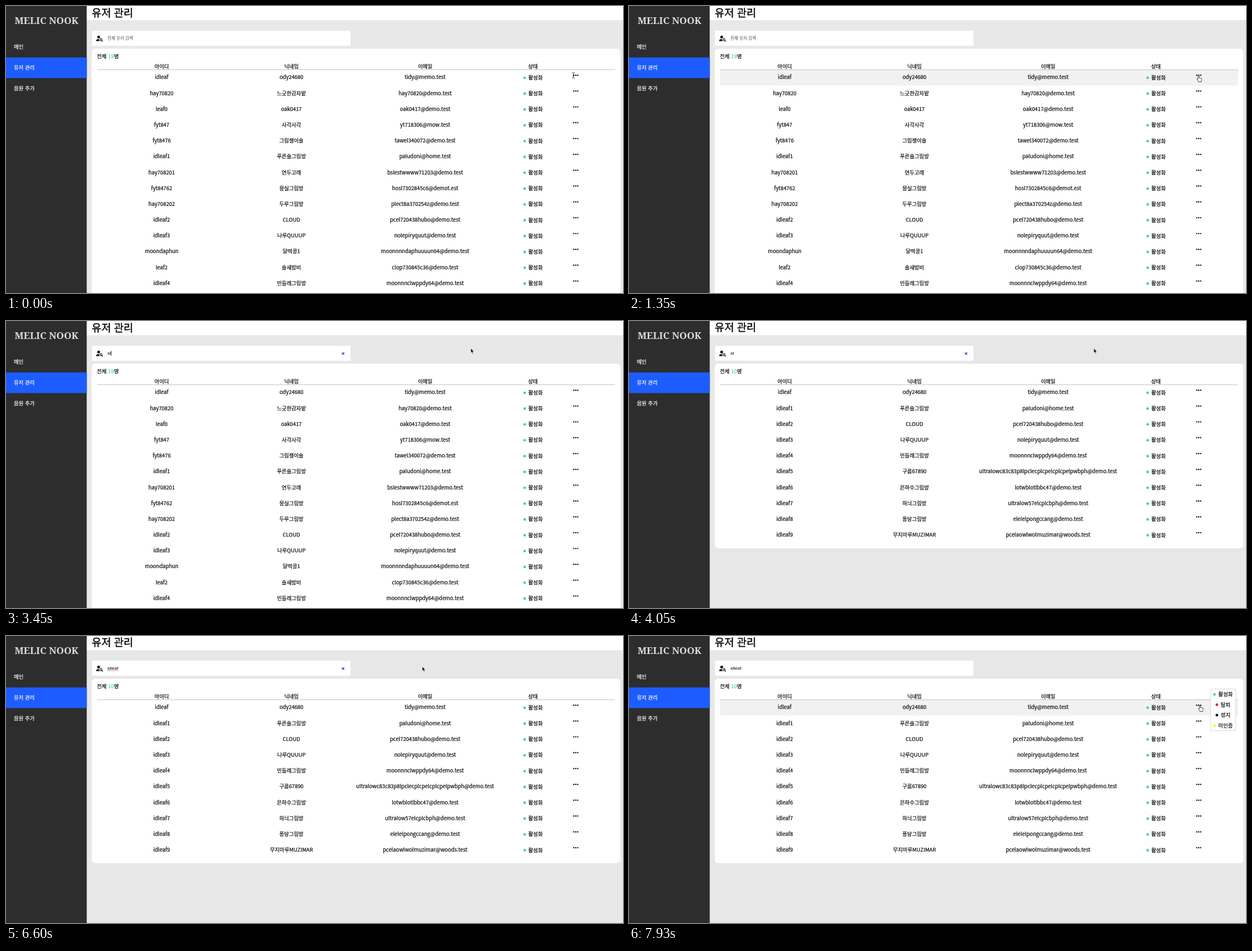
Recreate the animation shown at these times as an HTML page. Size 1096 by 511 pixels, loop 8000 ms.

```html
<!DOCTYPE html>
<html lang="ko">
<head>
<meta charset="utf-8">
<title>유저 관리</title>
<style>
  html, body { margin: 0; width: 100%; height: 100%; overflow: hidden; background: #e8e8e8; }
  svg { display: block; width: 1096px; height: 511px; }
  text { font: 9.33px "Noto Sans CJK KR", "Noto Sans KR", "Noto Sans CJK", sans-serif; white-space: pre;
         color: #0a0a0a; fill: currentColor; stroke: currentColor; stroke-width: .22px; }
  .mid text, text.mid { text-anchor: middle; }
  .menu text { color: #fff; }
  text.logo { font: 700 17px "Noto Serif", serif; color: #dcdcdc; stroke: none; text-anchor: middle; }
  text.title { font-size: 18.6px; stroke-width: .4px; }
  text.hint { font-size: 7.5px; color: #707070; stroke-width: .15px; }
  text.query { font: 8px "Liberation Sans", Arial, sans-serif; color: #000; stroke: none; }
  .green { color: #4adb80; fill: currentColor; }
</style>
</head>
<body>
<svg viewBox="0 0 1096 511">
  <rect id="back" width="1096" height="511" fill="#e8e8e8"/>
  <rect x="143" width="953" height="25.3" fill="#fff"/>
  <rect width="143.4" height="511" fill="#2d2d2d"/>
  <text class="logo" x="72" y="32.4">MELIC NOOK</text>
  <rect y="91.6" width="143.4" height="36.7" fill="#1d5dff"/>
  <g class="menu">
    <text x="14" y="75.7">메인</text>
    <text x="14" y="112.7">유저 관리</text>
    <text x="14" y="149.7">음원 추가</text>
  </g>
  <text id="title" class="title" x="152.3">유저 관리</text>

  <rect x="153" y="44" width="459" height="26.7" fill="#fff"/>
  <g fill="#111">
    <circle cx="164.6" cy="55.3" r="2.5"/>
    <path d="M160.2 62.6V61.2Q160.4 59 165 58.8Q164.8 61 166.6 62.6Z"/>
    <circle cx="168.7" cy="60" r="1.8" fill="none" stroke="#111" stroke-width="1.2"/>
    <path d="M170 61.3L171.9 63.2" stroke="#111" stroke-width="1.3"/>
  </g>
  <text id="hint" class="hint" x="180" y="60.4">전체 유저 검색</text>
  <text id="query" class="query" x="180.3" y="60.3"></text>
  <path id="typo" d="M180.3 61.7H199.3" stroke="#e8413c" stroke-width="1.1" stroke-dasharray="1.2 .8"/>
  <rect id="caret" y="53" width=".8" height="9" fill="#000"/>
  <path id="clear" d="M596.8 56L600.8 60M600.8 56L596.8 60" stroke="#2450b4" stroke-width="1.3"/>

  <rect id="panel" x="152.3" y="76" width="939" rx="6" fill="#fff"/>
  <text x="161.5" y="92.8">전체 <tspan id="count" class="green"></tspan>명</text>
  <g class="mid">
    <text x="276.5" y="110.8">아이디</text>
    <text x="507" y="110.8">닉네임</text>
    <text x="744.5" y="110.8">이메일</text>
    <text x="936" y="110.8">상태</text>
  </g>
  <rect id="hover" x="162" width="920" height="28" fill="#f1f1f1"/>
  <rect x="162" y="113" width="920" height=".8" fill="#b4b4b4"/>
  <g id="all" class="mid"></g>
  <g id="found" class="mid"></g>

  <g id="drop" class="mid">
    <rect x="1033" y="94.5" width="44.6" height="74" fill="#fff" stroke="#d8d8d8"/>
  </g>

  <g id="cursor">
    <path id="arrow" d="M0 0V8.3L1.9 6.6L3.2 9.8L4.7 9.2L3.4 6.1H6Z" fill="#111" stroke="#fff" stroke-width=".7"/>
    <path id="beam" d="M-2.4 -5Q-.3 -5 0 -4Q.3 -5 2.4 -5M0 -4V4M-2.4 5Q-.3 5 0 4Q.3 5 2.4 5M-1 1.5H1" fill="none" stroke="#222" stroke-width=".9"/>
    <path id="hand" d="M-1 .8Q0 -.5 1 .8V4Q2 3.3 2.7 4.2Q3.6 3.7 4.2 4.7Q5.3 4.4 5.4 5.5V7.6Q5.2 9 4.6 9.6V10.8H-.2V9.8L-2.6 6.8Q-3.2 5.7 -2.3 5.4Q-1.6 5.3 -1 6.2Z" fill="#fff" stroke="#111" stroke-width=".8"/>
  </g>
</svg>
<script>
const $ = id => document.getElementById(id);
const LOOP = 8000, ROW_TOP = 113.6, ROW_H = 28.19, ROW_X = [276.5, 507, 744.5];

// id, nickname, mail
const users = `idleaf ody24680 tidy@memo.test
hay70820 느긋한감자밭 hay70820@demo.test
leaf0 oak0417 oak0417@demo.test
fyt847 사각사각 yt718306@mow.test
fyt8476 그림쟁이솔 tawel340072@demo.test
idleaf1 푸른솔그림방 paludoni@home.test
hay708201 연두고래 bslestwwww71203@demo.test
fyt84762 몽실그림방 hosl7302845c6@demot.est
hay708202 두루그림방 plect8a370254z@demo.test
idleaf2 CLOUD pcel720438hubo@demo.test
idleaf3 나루QUUUP nolepiryquut@demo.test
moondaphun 달떡콩1 moonnnndaphuuuun64@demo.test
leaf2 솔새밤비 clop730845c36@demo.test
idleaf4 민들레그림방 moonnnclwppdy64@demo.test
idleaf5 구름67890 ultralowc83c83p8lpclecplcpelcplcpelpwbph@demo.test
idleaf6 은하수그림방 lotwblotlbbc47@demo.test
idleaf7 하늬그림방 ultralow57elcplcbph@demo.test
idleaf8 퐁당그림방 elelelpongccang@demo.test
idleaf9 무지마루MUZIMAR pcelaowlwolmuzimar@woods.test`.split("\n").map(line => line.split(" "));
const matches = users.filter(u => u[0].startsWith("id"));

function add(parent, tag, attrs, text = "") {
  const el = document.createElementNS("http://www.w3.org/2000/svg", tag);
  for (const k in attrs) el.setAttribute(k, attrs[k]);
  el.textContent = text;
  parent.append(el);
}

function fillTable(group, list) {
  list.forEach((user, i) => {
    const y = i * ROW_H;
    user.forEach((s, k) => add(group, "text", { x: ROW_X[k], y: 130.4 + y }, s));
    add(group, "circle", { cx: 921.3, cy: 127.8 + y, r: 2.4, class: "green" });
    add(group, "text", { x: 940.6, y: 130.9 + y }, "활성화");
    for (const dx of [-3.5, 0, 3.5]) add(group, "circle", { cx: 1012 + dx, cy: 123.2 + y, r: 1.2, fill: "#111" });
  });
}
fillTable($("all"), users);
fillTable($("found"), matches);

[["활성화", "#4adb80"], ["탈퇴", "#f81818"], ["정지", "#000"], ["미인증", "#fff02e"]].forEach(([s, fill], i) => {
  const y = 104 + i * 18.4;
  add($("drop"), "circle", { cx: 1052.9 - s.length * 4.3, cy: y, r: 2.4, fill });
  add($("drop"), "text", { x: 1059.7, y: y + 3.4 }, s);
});

// time, x, y, shape
const moves = [
  [0, 1008, 123.5, "beam"], [150, 1011, 128, "hand"], [300, 1012, 150, "hand"],
  [450, 1012, 170, "hand"], [600, 1013, 179, "hand"], [750, 1013, 164, "hand"],
  [900, 1012, 143, "hand"], [1050, 1012, 125, "hand"], [1200, 1013, 124, "hand"],
  [1350, 1011.8, 124.2, "hand"],
  [1800, 900, 96, "arrow"], [1950, 640, 54, "arrow"], [2100, 420, 39, "arrow"], [2250, 330, 58, "beam"],
  [2550, 640, 56, "arrow"], [2700, 825.6, 48.6, "arrow"],
  [5550, 818, 47, "arrow"], [5700, 795, 48, "arrow"], [5850, 765, 51, "arrow"],
  [6000, 746, 53, "arrow"], [6150, 739.3, 54.2, "arrow"],
  [6750, 780, 66, "arrow"], [6900, 880, 104, "arrow"], [7050, 975, 160, "arrow"],
  [7200, 1010, 182, "hand"], [7340, 1012, 172, "hand"], [7490, 1013, 150, "hand"],
  [7640, 1013, 130, "hand"], [7790, 1014, 124, "hand"], [7930, 1014.3, 123.6, "hand"]
];
// time, typed text, caret
const typing = [
  [0, "", false], [2550, "", true], [3000, "", false],
  [3450, "id", true], [4050, "id", false], [4200, "idl", true], [4350, "idle", true],
  [4800, "idle", false], [4950, "idlea", true], [5100, "idleaf", true],
  [5550, "idleaf", false], [6150, "idleaf", true], [6600, "idleaf", false],
  [7050, "idleaf", true], [7640, "idleaf", false]
];

const at = (list, t) => list.findLast(e => e[0] <= t);
const show = (id, on) => $(id).style.display = on ? "" : "none";

function draw(t) {
  const [, x, y, shape] = at(moves, t);
  const [, text, caret] = at(typing, t);
  const filtered = t >= 4050, clicked = t >= 7790;

  $("title").setAttribute("y", filtered ? 18.2 : 18.9);
  $("back").setAttribute("fill", filtered ? "#e7e7e7" : "#e8e8e8");
  const rows = filtered ? matches : users;
  $("count").textContent = rows.length;
  $("panel").setAttribute("height", 46.6 + rows.length * ROW_H);
  show("all", !filtered);
  show("found", filtered);

  $("query").textContent = text;
  show("hint", !text);
  show("clear", text && !clicked);
  show("typo", t >= 5550 && !clicked);
  show("caret", caret);
  $("caret").setAttribute("x", 180.3 + (text ? $("query").getComputedTextLength() : 0));

  const row = Math.floor((y - ROW_TOP) / ROW_H);
  show("hover", shape !== "beam" && row >= 0);
  $("hover").setAttribute("y", ROW_TOP + row * ROW_H);
  show("drop", clicked);

  for (const s of ["arrow", "beam", "hand"]) show(s, s === shape);
  $("cursor").setAttribute("transform", `translate(${x} ${y})`);
}

const start = performance.now();
function tick() {
  draw((performance.now() - start) % LOOP);
  requestAnimationFrame(tick);
}
tick();
</script>
</body>
</html>
```
